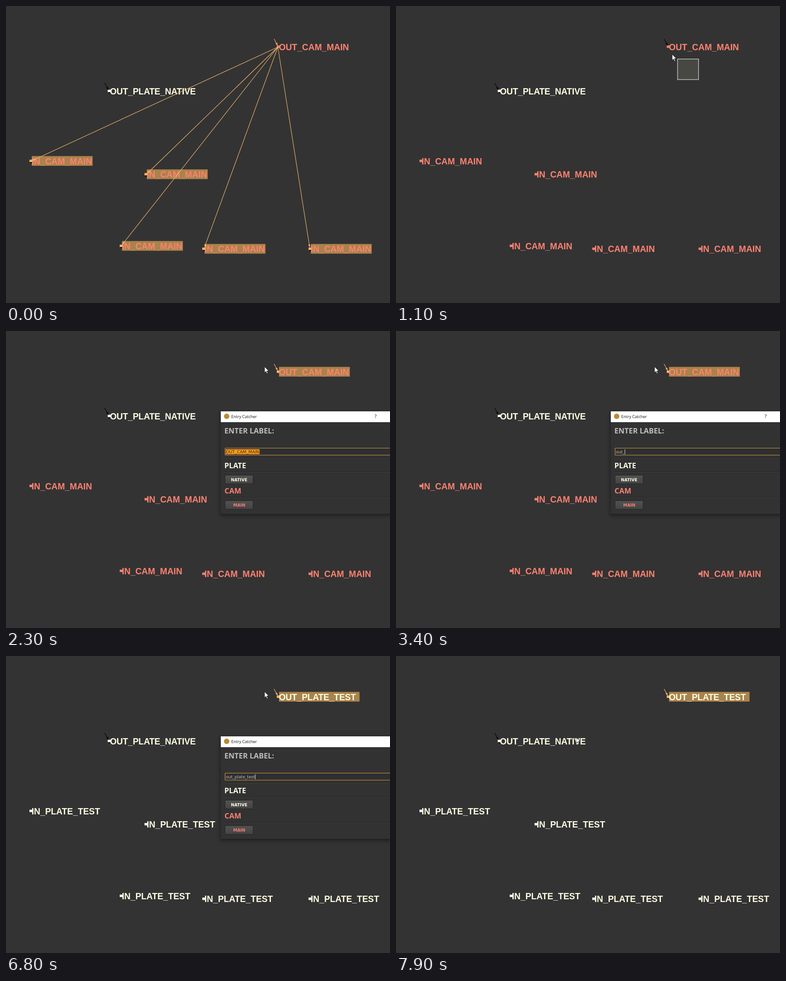
An HTML page for the animation above (8000 ms loop, 851x658 px).

```html
<!DOCTYPE html>
<html lang="en">
<head>
<meta charset="utf-8">
<title>Node labels</title>
<style>
  html, body { margin: 0; width: 100%; height: 100%; overflow: hidden; background: #333334; }
  svg { display: block; position: absolute; left: 0; top: 0; }
  .label { font: bold 19.3px "Liberation Sans", Arial, sans-serif; }
  .head { font: bold 16.3px "Open Sans", "Noto Sans", sans-serif; }
  .btn { font: bold 9px "DejaVu Sans", sans-serif; }
  .field { font: 9.3px "DejaVu Sans", sans-serif; }
  .title { font: 9px "Open Sans", "Noto Sans", sans-serif; fill: #111; }
</style>
</head>
<body>
<svg id="stage" width="851" height="658" viewBox="0 0 851 658">
  <defs>
    <linearGradient id="face" x1="0" y1="0" x2="0" y2="1">
      <stop offset="0" stop-color="#535353"/><stop offset="1" stop-color="#434343"/>
    </linearGradient>
    <filter id="shadow" x="-10%" y="-10%" width="120%" height="125%">
      <feGaussianBlur stdDeviation="4"/>
    </filter>
  </defs>

  <g id="nodes"></g>
  <g id="links" stroke="#f5b766" fill="#f5b766" stroke-width="1.1"></g>
  <rect id="marquee" fill="#8c8c78" fill-opacity=".22" stroke="#d2d2d2" stroke-width="1.3"/>

  <g id="dialog">
    <rect x="475" y="181" width="420" height="228" fill="#000" opacity=".42" filter="url(#shadow)"/>
    <rect x="476" y="202" width="400" height="203" fill="#323233"/>
    <rect x="476" y="178" width="400" height="24" fill="#fff"/>
    <circle cx="489" cy="189" r="6" fill="#b98a35"/>
    <text class="title" x="499.3" y="193">Entry Catcher</text>
    <text class="title" id="help" x="816.8" y="193" style="font-size:10.5px">?</text>
    <g id="form">
      <text class="head" x="484" y="226.5" fill="#bebebe">ENTER LABEL:</text>
      <rect x="485.5" y="259.5" width="400" height="15.5" rx="1" fill="#2f2f30" stroke="#dc9a3c" stroke-width="1.1"/>
      <rect id="pick" x="487" y="262" width="75" height="11" fill="#fb9a1e"/>
      <text class="field" id="entry" x="487.2" y="271"></text>
      <rect id="caret" y="262" width="1" height="11" fill="#ddd"/>
      <g id="rules"></g>
      <text class="head" x="484" y="303.5" fill="#fffde6">PLATE</text>
      <text class="head" x="484.3" y="360" fill="#fa8072">CAM</text>
      <g stroke="#242424" fill="url(#face)">
        <rect x="485.5" y="319.5" width="62" height="19" rx="1.5"/>
        <rect x="485.5" y="376" width="62" height="19" rx="1.5"/>
      </g>
      <g class="btn" text-anchor="middle">
        <text x="516.6" y="332.5" fill="#fffde6">NATIVE</text>
        <text x="517" y="389" fill="#fa8072">MAIN</text>
      </g>
    </g>
  </g>

  <path id="cursor" d="M0 0V13.2L3.1 10.4L5.3 15.4L7.3 14.5L5.1 9.6H9.2Z" fill="#fff" stroke="#111" stroke-width=".8"/>
</svg>

<script>
const LOOP = 8000, STEP = 100;
const SALMON = '#fd8270', CREAM = '#fffde2', AMBER = '#fbb862';
const $ = id => document.getElementById(id);

function add(parent, tag, attrs, text) {
  const el = document.createElementNS('http://www.w3.org/2000/svg', tag);
  set(el, attrs);
  if (text) el.textContent = text;
  parent.appendChild(el);
  return el;
}
function set(el, attrs) {
  for (const k in attrs) el.setAttribute(k, attrs[k]);
}
const show = (el, on) => { el.style.display = on ? '' : 'none'; };

// x, y is the top left corner of a node's label
function makeNode(x, y) {
  const g = $('nodes');
  return {
    band: add(g, 'rect', { x, y, height: 21.5, fill: '#a9834b' }),
    foot: add(g, 'rect', { x: x - 3.5, y: y + 12, width: 4, height: 3.6, fill: '#000' }),
    dot: add(g, 'rect', { x: x - 5, y: y + 8, width: 6, height: 5.3 }),
    text: add(g, 'text', { class: 'label', x: x - .3, y: y + 18 })
  };
}
function paint(node, label, color, picked, width, dotColor) {
  node.text.textContent = label;
  set(node.text, { fill: color, 'letter-spacing': label.startsWith('OUT_PLATE') ? -.18 : 0 });
  set(node.band, { width });
  set(node.dot, { fill: dotColor || (picked ? AMBER : color) });
  show(node.band, picked);
}

// thin line with a small arrow head at its end
function arrow(parent, x1, y1, x2, y2, size) {
  const g = add(parent, 'g', {});
  const deg = Math.atan2(y2 - y1, x2 - x1) * 180 / Math.PI;
  add(g, 'line', { x1, y1, x2, y2 });
  add(g, 'path', {
    d: `M0 0L${-size} ${-size * .38}V${size * .38}Z`, stroke: 'none',
    transform: `translate(${x2} ${y2}) rotate(${deg})`
  });
  return g;
}

const out = makeNode(605, 79.5);
const plate = makeNode(230.5, 177.5);
const inputs = [[57, 332.5], [312, 362], [257, 520.7], [440, 527.2], [675.5, 527.2]]
  .map(p => makeNode(...p));
[[58, 342.5], [314, 370], [258, 528], [440, 534], [673, 534.5]]
  .forEach(p => arrow($('links'), 602.5, 91, ...p, 6));

const outArrow = arrow($('nodes'), 594, 73, 602, 87.5, 6);
const plateArrow = arrow($('nodes'), 218.7, 170.7, 227, 185.5, 6);
set(plateArrow, { stroke: '#000', fill: '#000', 'stroke-width': 1.1 });
paint(plate, 'OUT_PLATE_NATIVE', CREAM, false, 0, '#fff');
show(out.foot, false);

for (const y of [280, 311, 368]) {
  add($('rules'), 'rect', { x: 485, y, width: 400, height: 1, fill: '#202020' });
  add($('rules'), 'rect', { x: 485, y: y + 1, width: 400, height: 1, fill: '#424242' });
}

// time, x, y of the pointer
const route = [
  [0, 700, -45], [200, 692, 20], [400, 678, 125], [600, 671, 163], [800, 671, 163],
  [900, 661, 153], [1000, 636, 128], [1100, 612, 107], [1200, 586, 88], [1300, 573, 79],
  [7500, 573, 79], [7600, 553, 91], [7700, 487, 130], [7800, 420, 168], [7900, 399, 180], [8000, 399, 180]
];
function pointer(t) {
  const i = Math.max(1, route.findIndex(p => p[0] >= t));
  const [a, b] = [route[i - 1], route[i]];
  const k = (t - a[0]) / (b[0] - a[0]);
  return [a[1] + (b[1] - a[1]) * k, a[2] + (b[2] - a[2]) * k];
}

const typed = 'out_plate_test';
const keys = [2600, 2700, 3100, 3400, 3800, 3900, 4100, 4300, 4400, 4700, 5600, 5800, 6200, 6300];

function draw(t) {
  const linked = t < 800, picked = t >= 1400, done = t >= 6800;
  const color = done ? CREAM : SALMON;

  show($('links'), linked);
  paint(out, done ? 'OUT_PLATE_TEST' : 'OUT_CAM_MAIN', color, picked, done ? 178.5 : 157);
  for (const n of inputs) {
    paint(n, done ? 'IN_PLATE_TEST' : 'IN_CAM_MAIN', color, linked, 135, done ? '#fff' : '');
    show(n.foot, linked);
  }
  const tint = linked || picked ? AMBER : '#000';
  set(outArrow, { stroke: tint, fill: tint, 'stroke-width': 1.1 });

  const [x, y] = pointer(t);
  set($('cursor'), { transform: `translate(${x} ${y})` });

  const dragging = t >= 900 && t < 1400;
  show($('marquee'), dragging);
  if (dragging) {
    const [mx, my] = pointer(t - 50);
    set($('marquee'), { x: mx, y: my, width: 670.5 - mx, height: 163 - my });
  }

  show($('dialog'), t >= 1500 && t < 6900);
  show($('form'), t >= 1700);
  show($('help'), !done);
  const count = keys.filter(k => k <= t).length;
  const entry = $('entry');
  entry.textContent = count ? typed.slice(0, count) : 'OUT_CAM_MAIN';
  set(entry, { fill: count ? '#bdbdbd' : '#3a2a10' });
  entry.style.fontSize = count ? '9.15px' : '9.3px';
  show($('pick'), !count);
  show($('caret'), count > 0 || t < 2300);
  if (t >= 1700 && t < 6900) set($('caret'), { x: 487.2 + entry.getComputedTextLength() });
}

let last = -1;
function tick(now) {
  const t = Math.floor(now % LOOP / STEP) * STEP;
  if (t !== last) draw(last = t);
  requestAnimationFrame(tick);
}
draw(0);
requestAnimationFrame(tick);
</script>
</body>
</html>
```
